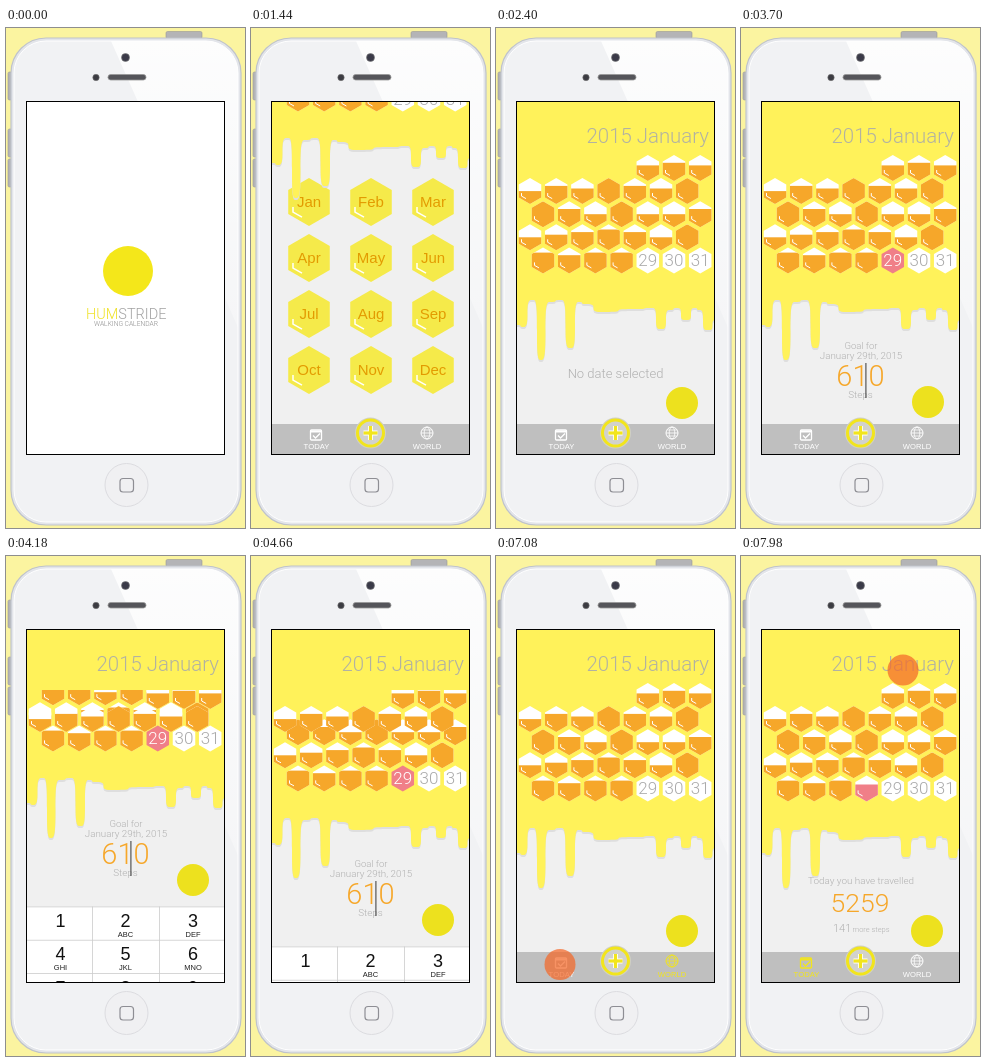
An HTML page with a canvas for the animation above (8 s loop, 239 by 500 pixels).

```html
<!DOCTYPE html>
<html lang="en">
<head>
<meta charset="utf-8">
<title>Walking calendar</title>
<style>
html, body { margin: 0; width: 100%; height: 100%; overflow: hidden; background: #fbf4a0; }
canvas { display: block; }
</style>
</head>
<body>
<canvas id="stage" width="239" height="500"></canvas>
<script>
const ctx = document.getElementById('stage').getContext('2d');
const LOOP = 8000;
const SCREEN = { x: 21, y: 74, w: 197, h: 352 };
const HONEY = '#fff25a', ORANGE = '#f6a72a', YELLOW = '#f2e51c', PINK = '#f07f88', GREY = '#b0b0b0';
const THIN = '300 SIZEpx Roboto, "Liberation Sans", sans-serif';
const PLAIN = 'SIZEpx "Liberation Sans", Arial, sans-serif';
const MONTHS = 'Jan Feb Mar Apr May Jun Jul Aug Sep Oct Nov Dec'.split(' ');
const KEYS = ['', 'ABC', 'DEF', 'GHI', 'JKL', 'MNO', 'PQRS', 'TUV', 'WXYZ'];
// Fill of each day's cell in tenths, days 1 to 28.
const LEVELS = [6, 7, 6, 5, 7, 6, 10, 7, 6, 10, 10, 7, 5, 10, 5, 5, 7, 5, 6, 7, 8, 7, 5, 10, 8, 7, 8, 8];
// Alternating valleys and tips along the lower edge of the honey.
const DRIPS = [[21, 297], [28, 299], [35, 272], [38, 272], [44, 332], [46, 332], [53, 274], [66, 272],
  [73, 320], [76, 320], [82, 274], [90, 276], [105, 284], [140, 281], [157, 280], [163, 301], [167, 301],
  [173, 282], [182, 280], [188, 292], [192, 292], [198, 280], [204, 282], [210, 302], [214, 302], [219, 292]];

function text(str, x, y, size, color, align = 'center', font = THIN) {
  ctx.font = font.replace('SIZE', size);
  ctx.textAlign = align;
  ctx.fillStyle = color;
  ctx.fillText(str, x, y);
}

function rect(x, y, w, h, color) {
  ctx.fillStyle = color;
  ctx.fillRect(x, y, w, h);
}

function roundRect(x, y, w, h, r, fill, stroke, width = 1) {
  ctx.beginPath();
  ctx.roundRect(x, y, w, h, r);
  paint(fill, stroke, width);
}

function circle(x, y, r, fill, stroke, width = 1) {
  ctx.beginPath();
  ctx.arc(x, y, r, 0, Math.PI * 2);
  paint(fill, stroke, width);
}

function paint(fill, stroke, width) {
  if (fill) { ctx.fillStyle = fill; ctx.fill(); }
  if (stroke) { ctx.strokeStyle = stroke; ctx.lineWidth = width; ctx.stroke(); }
}

function line(points, color, width) {
  ctx.beginPath();
  points.forEach(([x, y]) => ctx.lineTo(x, y));
  paint(null, color, width);
}

function hexPath(x, y, r) {
  ctx.beginPath();
  for (let i = 0; i < 6; i++) {
    const a = Math.PI / 3 * i - Math.PI / 2;
    ctx.lineTo(x + r * Math.cos(a), y + r * Math.sin(a));
  }
  ctx.closePath();
}

function clipped(path, draw) {
  ctx.save();
  path();
  ctx.clip();
  draw();
  ctx.restore();
}

function rectPath(x, y, w, h) {
  ctx.beginPath();
  ctx.rect(x, y, w, h);
}

function cell(x, y, level, color) {
  hexPath(x, y, 13);
  paint('#fff');
  clipped(() => hexPath(x, y, 13), () => rect(x - 13, y + 13 - 26 * level, 26, 26, color));
  line([[x - 8.5, y + 2], [x - 8.5, y + 5], [x - 4, y + 7.5]], '#fff', 1);
}

// The first two rows stay put; the others slide up beneath them by lift.
function calendar(drop, lift, selected) {
  for (let day = 31; day >= 1; day--) {
    const slot = day + 3, row = Math.floor(slot / 7);
    const x = (row % 2 ? 34 : 47) + (slot % 7) * 26.2;
    const y = 140 + row * 23.1 + drop - (row > 1 ? lift : 0);
    const chosen = day === selected;
    if (day <= 28) {
      cell(x, y, chosen ? 0.65 : LEVELS[day - 1] / 10, chosen ? PINK : ORANGE);
    } else {
      hexPath(x, y, 13);
      paint(chosen ? PINK : '#fff');
      text(day, x, y + 6, 17, chosen ? '#fff' : '#aaa');
    }
  }
}

function honeyPath(dy) {
  ctx.beginPath();
  ctx.moveTo(21, -150);
  ctx.lineTo(21, DRIPS[0][1] + dy);
  DRIPS.slice(1).forEach(([x, y], i) => {
    const [px, py] = DRIPS[i];
    ctx.bezierCurveTo(x, py + dy, px, y + dy, x, y + dy);
  });
  ctx.lineTo(219, -150);
  ctx.closePath();
}

// drop: entry offset of the whole sheet; lift: how far the keypad pushes it up.
function honeySheet(drop, lift, selected) {
  honeyPath(drop - lift + 2);
  paint('#dedede');
  honeyPath(drop - lift);
  paint(HONEY);
  text('2015 January', 213, 115 + drop, 20.4, '#b2b2a2', 'right');
  clipped(() => rectPath(21, (lift ? 134 : 122) + drop, 198, 300), () => calendar(drop, lift, selected));
}

function months(shift, alpha) {
  ctx.globalAlpha = alpha;
  MONTHS.forEach((name, i) => {
    const x = 58 + (i % 3) * 62, y = 187 + Math.floor(i / 3) * 56 + shift;
    hexPath(x, y, 24);
    paint('#f5ea48');
    line([[x - 16, y + 5], [x - 16, y + 10], [x - 7, y + 15]], '#fff', 1.5);
    text(name, x, y + 5, 15, '#e39a00', 'center', PLAIN);
  });
  ctx.globalAlpha = 1;
}

function mascot(x, y) {
  circle(x, y, 16, '#ede11e');
}

function plus(color, width) {
  line([[112.5, 405], [126.5, 405]], color, width);
  line([[119.5, 398], [119.5, 412]], color, width);
}

function tabBar(active, confirm) {
  const today = active === 'today' ? YELLOW : '#fff';
  const world = active === 'world' ? YELLOW : '#fff';
  rect(21, 396, 198, 30, '#bfbfbf');
  roundRect(59.5, 402, 11, 10, 1, null, today, 1.3);
  line([[59, 403.5], [71, 403.5]], today, 2);
  line([[62, 407.5], [64.5, 410], [69, 405.5]], today, 1.3);
  text('TODAY', 65.5, 421, 7.7, today, 'center', PLAIN);
  circle(176, 405, 6, null, world, 1);
  ctx.beginPath();
  ctx.ellipse(176, 405, 2.8, 6, 0, 0, Math.PI * 2);
  paint(null, world, 0.8);
  line([[170, 405], [182, 405]], world, 0.8);
  line([[171, 402], [181, 402]], world, 0.7);
  line([[171, 408], [181, 408]], world, 0.7);
  text('WORLD', 176, 421, 7.6, world, 'center', PLAIN);
  circle(119.5, 405, 15.5, '#d0d0c4');
  circle(119.5, 405, 13, '#d2d2cc', YELLOW, 3);
  if (confirm) {
    line([[112, 405], [117.5, 411], [127, 399]], '#fff3a0', 3.5);
  } else {
    plus('#fff', 5);
    plus(YELLOW, 3.2);
  }
}

function goalText(lift, caret) {
  text('Goal for', 120, 321 - lift, 9.5, GREY);
  text('January 29th, 2015', 120, 331 - lift, 9.8, GREY);
  text('610', 119.5, 358 - lift, 29, ORANGE);
  text('Steps', 119.5, 370 - lift, 9.8, GREY);
  if (caret) rect(124.3, 335 - lift, 1.2, 35, '#555');
}

function keypad(top) {
  rect(21, top, 198, 140, '#fff');
  for (let row = 0; row < 4; row++) {
    const y = top + row * 33.3;
    rect(21, y, 198, 0.8, '#ccc');
    for (let col = 0; col < 3; col++) {
      const n = row * 3 + col, x = [54.5, 119.5, 187][col];
      if (row < 3) text(n + 1, x, y + 20.5, 18, '#111', 'center', PLAIN);
      else if (col === 1) text('0', x, y + 20.5, 18, '#111', 'center', PLAIN);
      if (KEYS[n]) text(KEYS[n], x, y + 30, 7.5, '#222', 'center', PLAIN);
    }
  }
  rect(86, top, 0.8, 140, '#ccc');
  rect(153, top, 0.8, 140, '#ccc');
}

function touch(x, y) {
  circle(x, y, 15.5, 'rgba(244,104,40,.72)');
}

function splash() {
  rect(21, 74, 198, 352, '#fff');
  circle(122, 243, 25, '#f4e71a');
  text('HUM', 80, 291, 14.5, '#efe22a', 'left');
  text('STRIDE', 80 + ctx.measureText('HUM').width, 291, 14.5, '#a2a2a2', 'left');
  text('WALKING CALENDAR', 120, 298, 6.7, '#888');
}

function yearToMonth(p) {
  months(-112 * p, 1 - p * p);
  honeySheet(-183 * (1 - p), 0);
  ctx.globalAlpha = p;
  text('No date selected', 119.5, 350 + 108 * (1 - p), 13, GREY);
  ctx.globalAlpha = 1;
  mascot(186, 375 + 183 * (1 - p));
  tabBar();
}

function monthView(message, selected, active) {
  honeySheet(0, 0, selected);
  message();
  mascot(186, 375);
  tabBar(active);
}

function goalView(t) {
  const step = Math.floor(t / 20) * 20;
  const typing = t >= 4100 && t < 4680;
  const lift = !typing ? 0 : 100 * Math.min(1, (step - 4080) / 200, (4680 - step) / 200);
  honeySheet(0, lift, 29);
  goalText(lift, t >= 3200 && t < 4780);
  mascot(187, 374 - lift);
  if (typing) keypad(400.5 - lift);
  else tabBar();
}

function newGoalView() {
  honeySheet(0, 0);
  const veil = ctx.createLinearGradient(0, 218, 0, 250);
  veil.addColorStop(0, 'rgba(255,255,255,0)');
  veil.addColorStop(1, 'rgba(255,255,255,.5)');
  rect(21, 218, 198, 210, veil);
  const panel = ctx.createLinearGradient(0, 216, 0, 250);
  panel.addColorStop(0, 'rgba(255,255,255,.3)');
  panel.addColorStop(1, 'rgba(255,255,255,.92)');
  ctx.beginPath();
  ctx.moveTo(219, 220);
  ctx.lineTo(100, 220);
  ctx.bezierCurveTo(72, 228, 58, 245, 72, 280);
  ctx.bezierCurveTo(84, 320, 70, 360, 60, 396);
  ctx.lineTo(219, 396);
  paint(panel);
  text('New Goal', 141.5, 259, 18, '#f39a1e');
  text('Year | Month | Day', 142, 287, 11.6, GREY);
  text('0', 141, 323, 28, '#f0e23a');
  text('Steps', 141.5, 335, 9.8, GREY);
  mascot(48, 230);
  tabBar(null, true);
}

function noDate() {
  text('No date selected', 119.5, 350, 13, GREY);
}

function travelled() {
  text('Today you have travelled', 120, 328, 9.9, GREY);
  text('5259', 119, 356, 26.5, ORANGE);
  text('141', 92, 376, 11, GREY, 'left');
  text('more steps', 111.5, 376, 7.5, GREY, 'left');
}

function view(t) {
  if (t < 500) splash();
  else if (t < 1900) yearToMonth(t < 1400 ? 0 : (Math.floor(t / 20) * 20 - 1380) / 520);
  else if (t < 2600) monthView(noDate);
  else if (t < 4980) goalView(t);
  else if (t < 6180) newGoalView();
  else if (t < 6580) monthView(noDate);
  else if (t < 7280) monthView(() => {}, 0, 'world');
  else monthView(travelled, 28, 'today');
}

const TAPS = [[1000, 1200, 60, 187], [2500, 2600, 152, 232], [3100, 3200, 120, 348],
  [4780, 4980, 119, 406], [5980, 6180, 119, 406], [6380, 6580, 175, 408.5], [7080, 7280, 64, 408.5]];

function touches(t) {
  for (const [from, to, x, y] of TAPS) if (t >= from && t < to) touch(x, y);
  if (t >= 7780) touch(58 + 26 * Math.floor((t - 7780) / 50), 114);
}

function phone() {
  rect(0, 0, 239, 500, '#fbf4a0');
  roundRect(160, 3.5, 36, 7, 1.5, '#b4b4b6', '#999', 0.6);
  for (const y of [44, 101, 131]) roundRect(2, y, 4, 28, 1.5, '#b4b4b6', '#999', 0.6);
  roundRect(5, 10, 230, 487, 35, '#e3e5ea', '#bfc3cc', 1.2);
  roundRect(8, 13, 224, 481, 32, '#f1f2f4', '#fff', 1);
  ctx.beginPath();
  ctx.roundRect(105, 13, 127, 440, [0, 32, 0, 0]);
  const shine = ctx.createLinearGradient(0, 13, 0, 453);
  shine.addColorStop(0, 'rgba(255,255,255,.85)');
  shine.addColorStop(1, 'rgba(255,255,255,0)');
  clipped(() => {
    ctx.beginPath();
    [[105, 13], [239, 13], [239, 453], [300, 453], [131, 74]].forEach(([x, y]) => ctx.lineTo(x, y));
    ctx.lineTo(300, 453);
  }, () => roundRect(100, 13, 132, 440, [0, 32, 0, 0], shine));
  circle(119.5, 29.5, 4, '#3a3a48', '#777', 0.6);
  circle(90, 49.5, 3.2, '#3c3c42', '#777', 0.6);
  roundRect(102, 46.5, 38, 5.5, 2.7, '#55555a', '#999', 0.8);
  circle(120.5, 457, 21.5, '#f0f0f2', '#dcdce0', 1);
  roundRect(114, 450.5, 13.5, 13.5, 3, null, '#8e8e94', 1.2);
  rect(20, 73, 199, 354, '#000');
}

function frame(now) {
  const t = now % LOOP;
  phone();
  clipped(() => rectPath(SCREEN.x, SCREEN.y, SCREEN.w, SCREEN.h), () => {
    rect(SCREEN.x, SCREEN.y, SCREEN.w, SCREEN.h, '#f0f0f0');
    view(t);
    touches(t);
  });
  requestAnimationFrame(frame);
}
requestAnimationFrame(frame);
</script>
</body>
</html>
```
